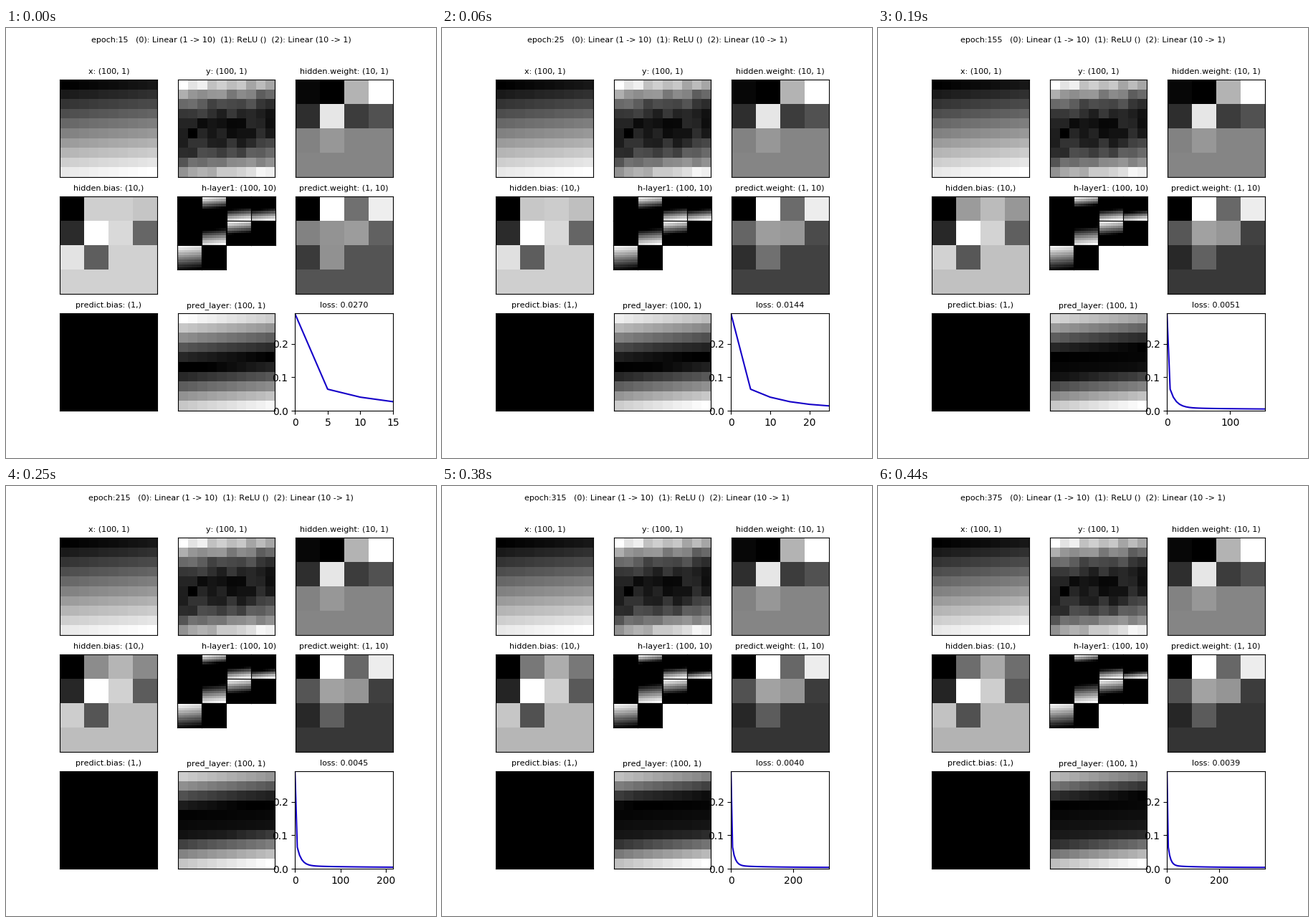
Write a matplotlib script that moves like this. It is 600x600 px and loops after 500 ms.

```python
import numpy as np
import matplotlib.pyplot as plt
from matplotlib.animation import FuncAnimation

plt.rcParams["text.kerning_factor"] = 6  # whole-pixel kerning

TICK_MS, LOOP_MS = 10, 500
FRAMES = LOOP_MS // TICK_MS
EPOCHS = [15, 25, 95, 155, 215, 255, 315, 375]

# a 1 -> 10 -> 1 network: hidden weights and biases, output weights
W = np.array([-.49, -.52, .18, .48, -.34, .38, -.28, -.20, -.01, .07])
B = np.array([-.53, -.005, -.005, -.03, -.42, .117, .02, -.27, .045, -.29])
V = np.array([-.33, .67, .11, .60, .18, .25, .28, .05, -.10, .24])

X = np.linspace(-1, 1, 100)
ALIVE = (np.outer(X, W) + B > 0).any(axis=0)


def unit(a):
    """Scale to 0..1; a constant array becomes black."""
    a = np.asarray(a, float)
    span = a.max() - a.min()
    return (a - a.min()) / span if span else a * 0


def tile(a, n):
    """Lay values out in an n x n grid, filled up with zeros."""
    return unit(np.append(a, np.zeros(n * n - len(a)))).reshape(n, n)


def network(p):
    """Biases, output weights, hidden layer and prediction at progress p."""
    b = B + .75 * W ** 2 * np.sign(B) * ALIVE * p ** .75
    v = V + 1.15 * np.abs(W) * ALIVE * p ** .2
    hidden = np.maximum(np.outer(X, W) + b, 0)
    return b, v, hidden, hidden @ v


def loss(e):
    return (.187 * np.exp(-e / .9) + .09388 * np.exp(-e / 9.189)
            + .0057 * np.exp(-e / 110) + .00368)


def image(spec, data, title=""):
    ax = fig.add_subplot(spec, xticks=[], yticks=[])
    ax.set_title(title, fontsize=8)
    return ax.imshow(data, cmap="gray", vmin=0, vmax=1,
                     interpolation="nearest")


fig = plt.figure(figsize=(6, 6), dpi=100, facecolor="white")
heading = fig.suptitle("", fontsize=8)
grid = fig.add_gridspec(3, 3)
inner = grid[1, 1].subgridspec(4, 4, wspace=0, hspace=0)

noise = np.random.default_rng(4).random(100)
b, v, hidden, out = network(0)

image(grid[0, 0], tile(X + 1, 10), "x: (100, 1)")
image(grid[0, 1], tile(X ** 2 + .2 * noise, 10), "y: (100, 1)")
image(grid[0, 2], tile(W, 4), "hidden.weight: (10, 1)")
bias_img = image(grid[1, 0], tile(b, 4), "hidden.bias: (10,)")
cells = [image(inner[n // 4, n % 4], tile(hidden[:, n], 10),
               "h-layer1: (100, 10)" if n == 2 else "") for n in range(10)]
out_w_img = image(grid[1, 2], tile(v, 4), "predict.weight: (1, 10)")
image(grid[2, 0], [[0]], "predict.bias: (1,)")
pred_img = image(grid[2, 1], tile(out, 10), "pred_layer: (100, 1)")

loss_ax = fig.add_subplot(grid[2, 2], ylim=(0, .2915))
curve, = loss_ax.plot([], [], color="#1400c8", lw=1.5)
loss_title = loss_ax.set_title("", fontsize=8)


def update(i):
    epoch = EPOCHS[int((i + .4) * len(EPOCHS) / FRAMES)]
    p = (epoch - EPOCHS[0]) / (EPOCHS[-1] - EPOCHS[0])
    b, v, hidden, out = network(p)

    heading.set_text(f"epoch:{epoch}   (0): Linear (1 -> 10)  "
                     "(1): ReLU ()  (2): Linear (10 -> 1)")
    bias_img.set_data(tile(b, 4))
    out_w_img.set_data(tile(v, 4))
    pred_img.set_data(tile(out, 10))
    for cell, h in zip(cells, hidden.T):
        cell.set_data(tile(h, 10))

    e = np.arange(0, epoch + 1, 5)
    curve.set_data(e, loss(e))
    loss_ax.set_xlim(0, epoch)
    loss_title.set_text(f"loss: {loss(epoch):.4f}")
    return []


anim = FuncAnimation(fig, update, frames=FRAMES, interval=TICK_MS,
                     repeat=True, repeat_delay=0)
plt.show()
```
